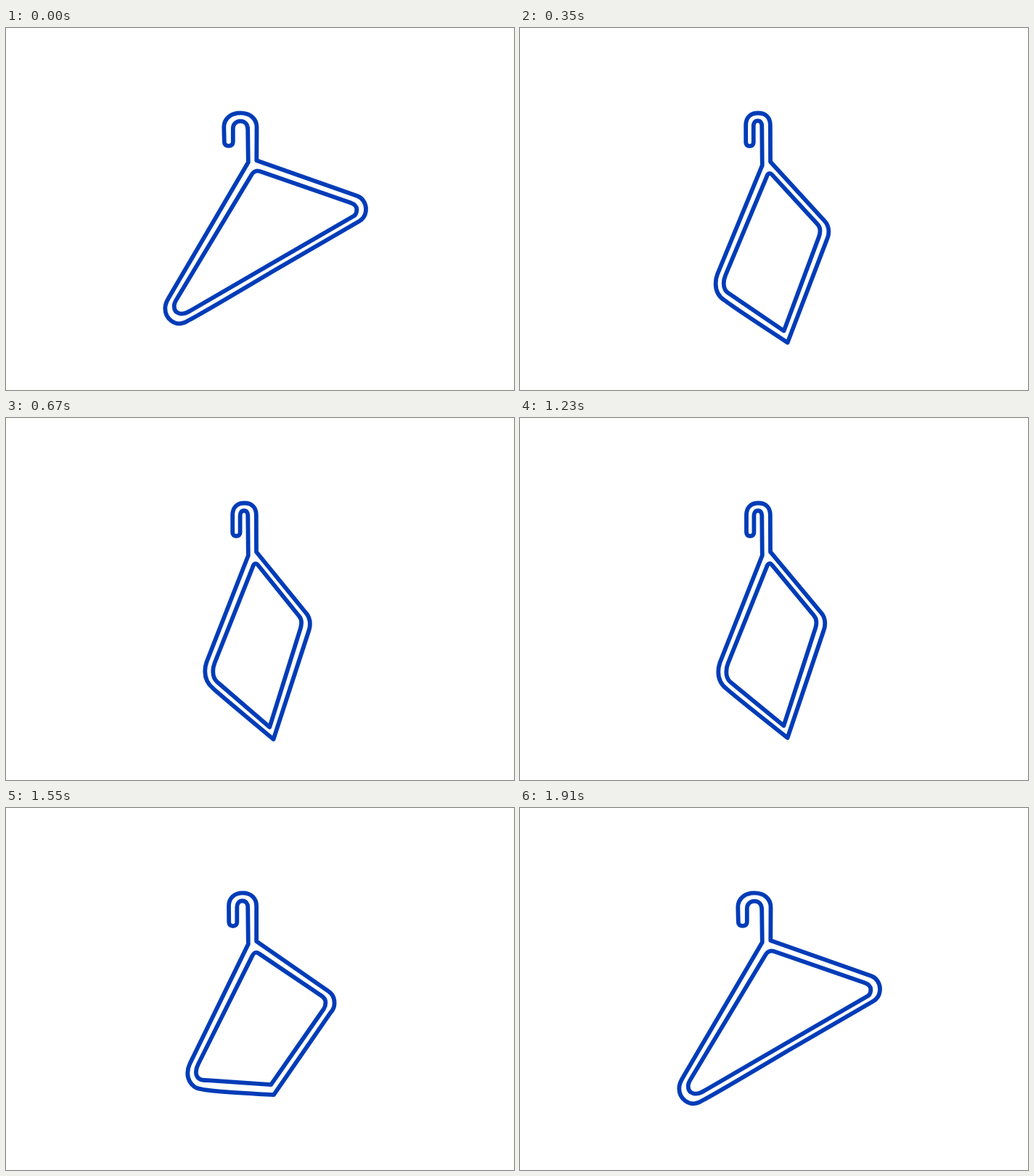
Write an HTML page that moves like this. It is 700 by 500 pixels and loops after 2390 ms.

```html
<!DOCTYPE html>
<html lang="en">
<head>
<meta charset="utf-8">
<title>Folding hanger</title>
<style>
  html, body { margin: 0; width: 100%; height: 100%; overflow: hidden; background: #fff; }
  svg { display: block; width: 100%; height: 100%; }
  path { fill: none; stroke: #003cb8; stroke-width: 5.8; stroke-linejoin: round; }
</style>
</head>
<body>
<svg viewBox="0 0 700 500">
  <path id="outline"></path>
  <path id="opening"></path>
</svg>
<script>
const LOOP = 2390, TICK = 40, LEAD = 10;
const MOVE = 18, UNFOLD_AT = 30; // in ticks

// Each shape has the same commands in both poses, so its numbers can be blended.
const shapes = {
  outline: {
    open: `M300.8 157.5 L300.3 137 C300.3 125 310 117.4 323 117.4 S345.5 125 345.5 137
      L345.3 183 L484 232 C491 234.5 496 242 496 250 S492.5 263.5 486.5 267
      L369.5 335 Q258 401.5 246 406.8 C233 412 219.3 402 219.3 387 Q219.3 381 224 373
      L333.8 185.5 L333.2 140 C333.2 133 329 128.6 323 128.6 S312.8 133 312.8 139
      L312.8 157.5 C312.8 161 310.5 162.8 306.8 162.8 S300.8 161 300.8 157.5 Z`,
    folded: `M312.2 158 L312.2 134 C312.2 124 318 117.5 328.5 117.5 S344.8 124 344.8 134
      L345 185 L413.5 269.5 C417 273.5 418.8 279 418.8 284.5 S418 291 417 294.5
      L368.6 443.8 Q297 384 285.5 373.5 C278 367.5 274.3 359 274.3 350 Q274.3 343 276.5 337
      L333.8 190 L333.3 135 C333.3 131 331.5 128 328 128 S322.6 131 322.6 135
      L322.6 158 C322.6 161.5 320.5 163.2 317.4 163.2 S312.2 161.5 312.2 158 Z`
  },
  opening: {
    open: `M338.5 202.5 C341 198.5 345 196.3 350 198 L474.5 241.2
      C479.5 243 483.3 246.5 483.3 250.5 S482.5 257.5 479.5 259.5 L367.5 324.5
      L254 390.5 C243 397.5 231.7 395.5 231.7 384 Q231.7 380 235.5 374 Z`,
    folded: `M340.3 205 C341.5 201 344.5 199.5 347.3 203.3 L403.5 273.3
      C406 276 407 279.5 407 283 S406.5 288 405.5 291.5 L363.3 427
      L291 364.5 C286.5 360.5 285.3 355 285.3 350 Q285.3 344 287.5 338.5 Z`
  }
};

const NUM = /[\d.]+/g;
const parts = Object.entries(shapes).map(([id, { open, folded }]) => ({
  node: document.getElementById(id),
  open,
  to: folded.match(NUM).map(Number)
}));

function blend({ open, to }, p) {
  let i = 0;
  return open.replace(NUM, n => (+n + (to[i++] - n) * p).toFixed(2));
}

function bezier(x1, y1, x2, y2) {
  const at = (a, b, s) => 3 * (1 - s) ** 2 * s * a + 3 * (1 - s) * s * s * b + s ** 3;
  return x => {
    if (x <= 0) return 0;
    if (x >= 1) return 1;
    let lo = 0, hi = 1;
    for (let i = 0; i < 24; i++) {
      const mid = (lo + hi) / 2;
      if (at(x1, x2, mid) < x) lo = mid; else hi = mid;
    }
    return at(y1, y2, lo);
  };
}

const fold = bezier(0.14, 0.56, 0.18, 1);
const unfold = bezier(0.167, 0, 0.833, 0.833);

function draw(ms) {
  const k = Math.floor((ms % LOOP + LEAD) / TICK);
  const p = k < UNFOLD_AT ? fold(k / MOVE) : 1 - unfold((k - UNFOLD_AT) / MOVE);
  for (const part of parts) part.node.setAttribute("d", blend(part, p));
}

const start = performance.now();
function loop() {
  draw(performance.now() - start);
  requestAnimationFrame(loop);
}
loop();
</script>
</body>
</html>
```
